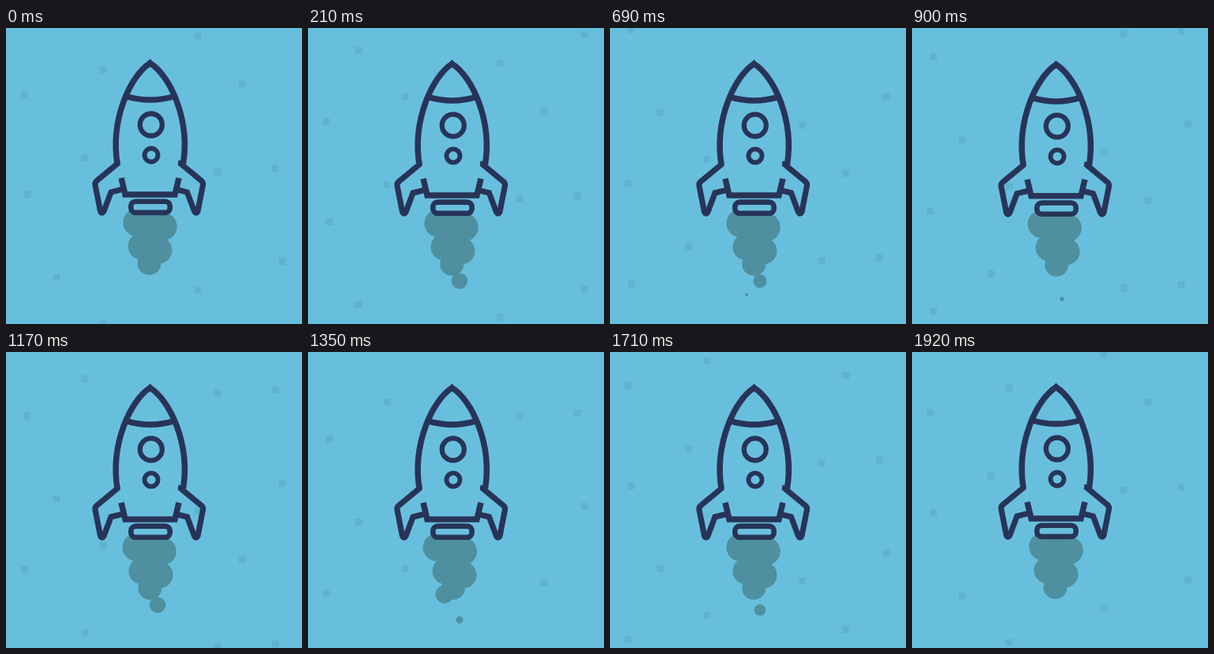
An HTML page with a canvas that plays this animation: 375x375 px, repeating every 1950 ms.

```html
<!DOCTYPE html>
<html lang="en">
<head>
<meta charset="utf-8">
<title>Rocket</title>
<style>
html, body { margin: 0; width: 100%; height: 100%; overflow: hidden; background: #68bfdd; }
canvas { display: block; width: 375px; height: 375px; }
</style>
</head>
<body>
<canvas width="375" height="375"></canvas>
<script>
const c = document.querySelector('canvas').getContext('2d');
const SKY = '#68bfdd', INK = '#273458', SMOKE = '#4e909f', STAR = '#5eb4d0';
const STEP = 30, LOOP = 1950, TILE = 322, STAR_SIZE = 9;

const stars = [[243, 10], [123, 53], [23, 84], [299, 71], [100, 164], [268, 182],
  [341, 178], [27, 211], [350, 296], [64, 316]];

const hull = new Path2D(
  'M182.5 44.5C158 60 132 115 141 172M182.5 44.5C207.5 60 233.5 115 224.5 172' +
  'M182 45L182.5 44.5L183 45M152 86.5Q183 95.7 213 86.5M146 190L151 211H214L219 190');
const fin = new Path2D(
  'M140.5 168L141 172L115 193.5Q112.5 195.5 113 199L119.5 232Q121.5 236.5 124 232L133 208L149 204');

function circle(x, y, r) {
  c.beginPath();
  c.arc(x, y, Math.max(r, 0), 0, 2 * Math.PI);
}

function disc(x, y, r) {
  circle(x, y, r);
  c.fill();
}

function ring(x, y, r) {
  circle(x, y, r);
  c.stroke();
}

// Triangle wave rising one unit per step
const sway = (n, period) => Math.min(n % period, period - n % period);

// A falling drop that shrinks, released every 32 steps
function drop(n, start, x, y, r) {
  const age = (n - start) % 32, life = 16.5;
  if (n < start || age > life) return;
  disc(x, y + 3.1 * age, r * (1 - (age / life) ** 1.8) * Math.min(1, age / 3));
}

function smoke(n) {
  const s = sway(n, 8);
  c.fillStyle = SMOKE;
  // Two rows of paired puffs swaying against each other
  for (const row of [0, 1]) {
    const shift = row ? s : -.9 * s, r = 17.7 - .7 * row;
    for (const side of [-1, 1])
      disc(182.5 + shift + side * (16.5 - 5.5 * row), 249 + 30 * row + side * 2.5, r);
  }
  disc(182, 252, 18);
  disc(181.5 + .8 * s, 298, 15);
  drop(n, 0, 192, 298, 13);
  drop(n, 8, 173, 290.5, 13);
  drop(n, 16, 190, 298, 11);
}

function rocket() {
  c.strokeStyle = INK;
  c.lineWidth = 7.5;
  c.stroke(hull);
  c.lineWidth = 7.2;
  c.stroke(fin);
  c.save();
  c.translate(362.5, 0);
  c.scale(-1, 1);
  c.stroke(fin);
  c.restore();
  c.lineWidth = 6.3;
  ring(183.8, 122.5, 14);
  c.lineWidth = 5.8;
  ring(184, 161, 8.5);
  c.fillStyle = SKY;
  c.lineWidth = 6.6;
  c.beginPath();
  c.roundRect(158.3, 219.7, 49.4, 14.2, 6);
  c.fill();
  c.stroke();
}

function draw(now) {
  const n = Math.floor(now % LOOP / STEP);
  c.fillStyle = SKY;
  c.fillRect(0, 0, 375, 375);
  c.fillStyle = STAR;
  for (const [x, y] of stars) {
    const top = (y + n * 4.92) % TILE - STAR_SIZE / 2;
    for (const k of [-1, 0, 1])
      c.fillRect(x - STAR_SIZE / 2, top + k * TILE, STAR_SIZE, STAR_SIZE);
  }
  c.save();
  c.translate(0, sway(n, 4) * .9);
  smoke(n);
  rocket();
  c.restore();
}

const begin = performance.now();
function tick() {
  draw(performance.now() - begin);
  requestAnimationFrame(tick);
}
tick();
</script>
</body>
</html>
```
